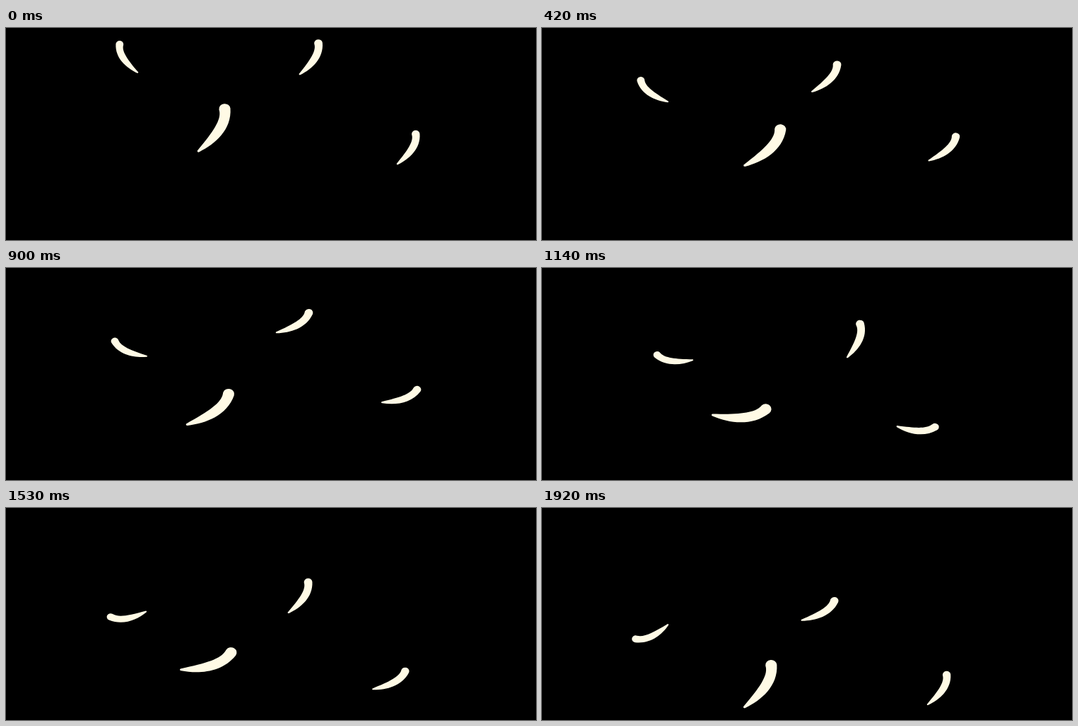
These frames come from a looping animation (750x300 px, 2.1 s). An HTML page with a canvas:

```html
<!DOCTYPE html>
<html lang="en">
<head>
<meta charset="utf-8">
<title>Falling petals</title>
<style>
  html, body { margin: 0; width: 100%; height: 100%; overflow: hidden; background: #000; }
  canvas { display: block; width: 750px; height: 300px; }
</style>
</head>
<body>
<canvas id="stage" width="750" height="300"></canvas>
<script>
const ctx = document.getElementById('stage').getContext('2d');
const LOOP = 2100, STEP = 30, STRETCH = 1.1;

const smooth = u => (1 - Math.cos(Math.PI * u)) / 2;
const speedUp = u => u * u;
const brake = u => 1 - (1 - u) ** 2;
const linger = u => smooth(u * u);

// Every petal swings out, falls back, hangs at the turn, swings again and settles
const legs = [
  { from: 0, to: 540, ease: smooth },
  { from: 540, to: 900, ease: speedUp },
  { from: 900, to: 1140, ease: brake },
  { from: 1140, to: 1680, ease: linger },
  { from: 1680, to: 1920, ease: smooth }
];

// Poses between the legs: centre of the round end, slope of the tip in degrees
const petals = [
  { size: 47, side: 1, poses: [
    [160.8, 23, 60], [137, 80.8, 38.5], [154, 103.5, 27.5],
    [163, 123, 9], [135, 181.3, -25.5], [132.6, 185.3, -26]] },
  { size: 51, side: -1, poses: [
    [442, 21.5, 61.5], [414.3, 55.8, 48.5], [428.5, 63.3, 34],
    [450, 79, 71], [408, 127.5, 49.7], [413.7, 131.3, 33.3]] },
  { size: 70, side: -1, poses: [
    [309.5, 114.5, 60.5], [340.9, 147.4, 46.4], [315, 178.3, 39],
    [316.5, 199.7, 7], [320, 208.8, 32.5], [324.3, 222.3, 60]] },
  { size: 49.5, side: -1, poses: [
    [579.8, 150, 61], [586.3, 154, 42.4], [581.7, 172, 22],
    [556, 225, -1], [572.6, 236, 60]] }
];

function poseAt(poses, t) {
  const i = legs.findIndex(leg => t <= leg.to);
  const next = poses[i + 1];
  if (i < 0 || !next) return poses[poses.length - 1];
  const { from, to, ease } = legs[i];
  const k = ease((t - from) / (to - from));
  return poses[i].map((v, n) => v + (next[n] - v) * k);
}

// One petal of length 1, round end at the origin, tip to the right
const shape = new Path2D();
shape.moveTo(0.08, -0.068);
shape.bezierCurveTo(0.22, 0.055, 0.5, 0.045, 0.985, -0.022);
shape.quadraticCurveTo(1.018, -0.004, 0.988, 0.02);
shape.bezierCurveTo(0.7, 0.2, 0.3, 0.32, -0.06, 0.086);
shape.arc(0, 0, 0.105, 2.18, 5.58);
shape.closePath();

function drawPetal({ size, side, poses }, t) {
  const [x, y, turn] = poseAt(poses, t);
  ctx.save();
  ctx.translate(x, y);
  ctx.scale(side * STRETCH, 1);
  ctx.rotate(turn * Math.PI / 180);
  ctx.scale(size, size);
  ctx.fill(shape);
  ctx.restore();
}

const start = performance.now();

function frame(now) {
  const time = Math.max(0, now - start) % LOOP;
  const t = Math.floor(time / STEP) * STEP;
  ctx.fillStyle = '#000';
  ctx.fillRect(0, 0, 750, 300);
  ctx.fillStyle = '#fffae5';
  petals.forEach(p => drawPetal(p, t));
  requestAnimationFrame(frame);
}
frame(start);
</script>
</body>
</html>
```
